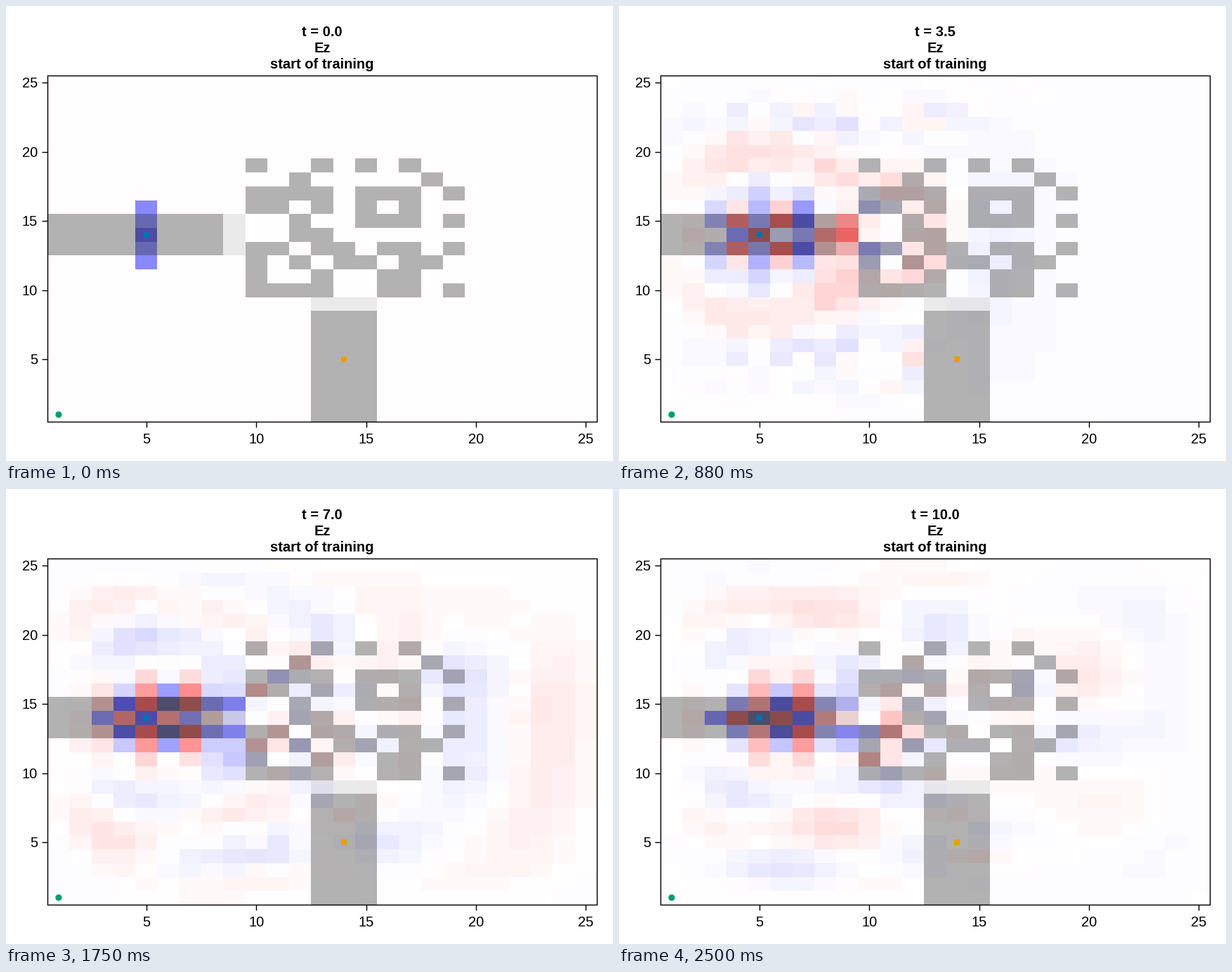
A matplotlib script for the animation above (2.56 s loop, 864x648 px).

```python
import numpy as np
import matplotlib.pyplot as plt
from matplotlib.animation import FuncAnimation
from matplotlib.patches import Circle, Rectangle

plt.rcParams["font.family"] = "Liberation Sans"

W, H, DPI = 864, 648, 100
LEFT, RIGHT, TOP, BOTTOM = 59.3, 840.8, 99.2, 591.8
N, PAD = 25, 4
FRAMES, LOOP_MS = 41, 2560
FONT = 20.16 * 72 / DPI
LINE = 1.44 * 72 / DPI

# Filled columns of the design block, keyed by row.
BLOCK = {
    19: [10, 13, 15, 17],
    18: [12, 18],
    17: [10, 11, 12, 13, 15, 16, 17, 19],
    16: [10, 11, 13, 15, 17],
    15: [12, 15, 16, 17, 19],
    14: [12, 13],
    13: [10, 11, 13, 14, 16, 17, 19],
    12: [10, 12, 14, 15, 17, 18],
    11: [10, 13, 16, 17],
    10: [10, 11, 12, 13, 16, 17, 19],
}


def make_geometry():
    g = np.zeros((N, N))
    g[12:15, :8] = 1
    g[:8, 12:15] = 1
    g[12:15, 8] = g[8, 12:15] = 0.25
    for row, cols in BLOCK.items():
        g[row - 1, np.array(cols) - 1] = 1
    return g


def simulate(geometry, steps_per_frame=4, dt=1 / 16, dx=1 / 8):
    """Ez of a 2D Yee grid with lossy edges, one snapshot per frame."""
    eps = np.pad(2.25 + 10 * geometry, PAD, mode="edge")
    size = N + 2 * PAD
    depth = np.abs(np.arange(size) - (size - 1) / 2) - 9.8
    edge = 2.5 * np.clip(depth, 0, None)
    loss = (edge[:, None] + edge[None, :]) * dt / 2
    loss_x = (loss[1:] + loss[:-1]) / 2
    loss_y = (loss[:, 1:] + loss[:, :-1]) / 2

    drive = np.zeros((size, size))
    drive[PAD + 11:PAD + 16, PAD + 4] = [0.23, 0.36, 0.6, 0.36, 0.23]

    ez = np.zeros((size, size))
    hx = np.zeros((size - 1, size))
    hy = np.zeros((size, size - 1))
    c = dt / dx
    shots = []
    for n in range((FRAMES - 1) * steps_per_frame + 1):
        curl = (np.diff(hy, axis=1, prepend=0, append=0)
                - np.diff(hx, axis=0, prepend=0, append=0))
        ez = ((1 - loss) * ez + c * curl / eps) / (1 + loss)
        ez -= drive * np.cos(2 * np.pi * n * dt)
        if n % steps_per_frame == 0:
            shots.append(ez[PAD:-PAD, PAD:-PAD].copy())
        hx = ((1 - loss_x) * hx - c * np.diff(ez, axis=0)) / (1 + loss_x)
        hy = ((1 - loss_y) * hy + c * np.diff(ez, axis=1)) / (1 + loss_y)
    return shots


def px(x):
    return LEFT + (x - 0.5) * (RIGHT - LEFT) / N


def py(y):
    return BOTTOM - (y - 0.5) * (BOTTOM - TOP) / N


geometry = make_geometry()
fields = simulate(geometry)
cover = 0.6 * geometry[..., None]
seismic = plt.get_cmap("seismic")


def shade(field):
    rgb = seismic(np.clip((field + 1) / 2, 0, 1))[..., :3]
    return rgb * (1 - cover) + cover * 0.502


fig = plt.figure(figsize=(W / DPI, H / DPI), dpi=DPI, facecolor="white")
ax = fig.add_axes([0, 0, 1, 1])
image = ax.imshow(shade(fields[0]), origin="lower", interpolation="nearest",
                  extent=(LEFT, RIGHT, BOTTOM, TOP), aspect="auto")
ax.set_xlim(0, W)
ax.set_ylim(H, 0)
ax.axis("off")


def label(x, y, text, ha="center", weight="normal"):
    return ax.text(x, y, text, ha=ha, va="baseline", size=FONT,
                   weight=weight, color="black")


def square(x, y, color, side=8.2):
    ax.add_patch(Rectangle((px(x) - side / 2, py(y) - side / 2), side, side,
                           color=color, lw=0, zorder=4))


square(5, 14, "#0072B2")
square(14, 5, "#E69F00")
ax.add_patch(Circle((px(1), py(1)), 4.6, color="#009E73", lw=0, zorder=4))
ax.add_patch(Rectangle((LEFT, TOP), RIGHT - LEFT, BOTTOM - TOP, fill=False,
                       ec="black", lw=LINE, zorder=3))

for tick in range(5, 26, 5):
    ax.plot([px(tick)] * 2, [BOTTOM, BOTTOM + 8], color="black", lw=LINE,
            solid_capstyle="butt")
    ax.plot([LEFT - 8, LEFT], [py(tick)] * 2, color="black", lw=LINE,
            solid_capstyle="butt")
    label(px(tick), 623, str(tick))
    label(45, py(tick) + 7.2, str(tick), ha="right")

clock = label(450, 43, "t = 0.0", weight="bold")
label(450, 66, "Ez", weight="bold")
label(450, 89.3, "start of training", weight="bold")


def update(k):
    image.set_data(shade(fields[k]))
    clock.set_text(f"t = {k / 4}")
    return image, clock


anim = FuncAnimation(fig, update, frames=FRAMES, interval=LOOP_MS / FRAMES,
                     repeat=True, repeat_delay=0, blit=False)
plt.show()
```
